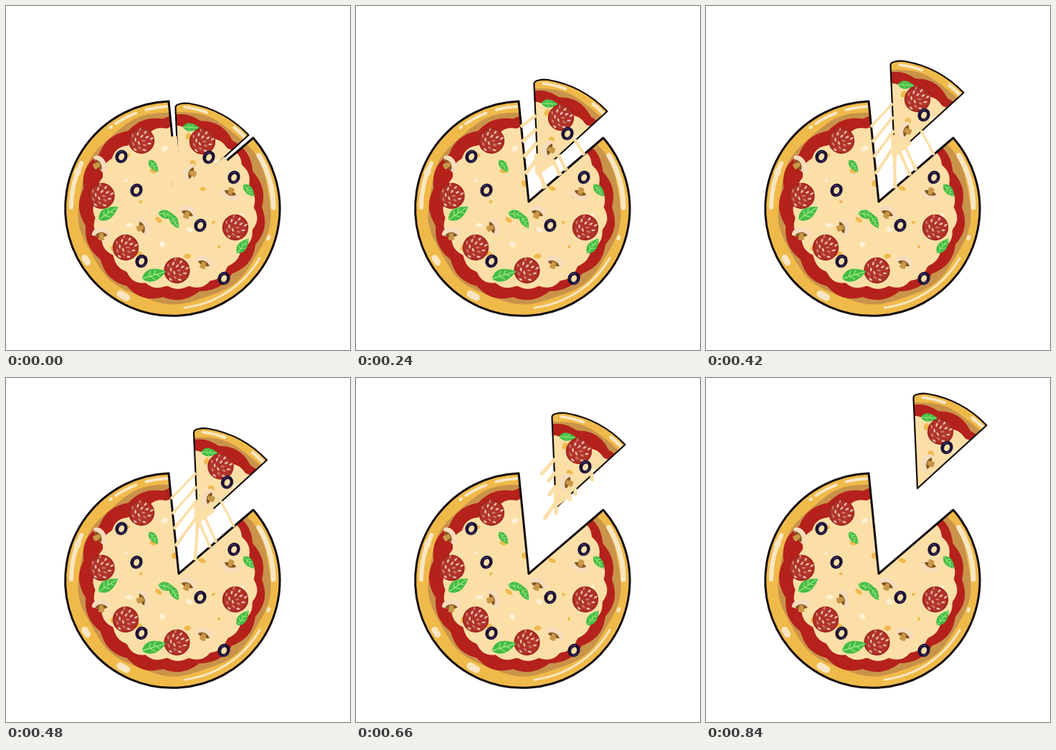
Recreate the animation shown at these times as an HTML page. Size 480 by 480 pixels, loop 0.96 s.

```html
<!DOCTYPE html>
<html lang="en">
<head>
<meta charset="utf-8">
<title>Pizza slice</title>
<style>
html, body { margin: 0; width: 100%; height: 100%; overflow: hidden; background: #fff; }
svg { display: block; width: 100vw; height: 100vh; }
</style>
</head>
<body>
<svg id="stage" viewBox="0 0 480 480"></svg>
<script>
const CHEESE = '#fcdfa7', SAUCE = '#b5211b', CRUST = '#efba49', TAN = '#c9934a',
      SHINE = '#fae6c2', INK = '#130b08', GOLD = '#efb94c';
const CX = 232, CY = 281, TAU = Math.PI * 2;
const stage = document.getElementById('stage');

const path = (d, fill, extra = '') => `<path d="${d}" fill="${fill}" ${extra}/>`;
const line = (d, color, width, cap = 'round') =>
  path(d, 'none', `stroke="${color}" stroke-width="${width}" stroke-linecap="${cap}" stroke-linejoin="round"`);
const oval = (x, y, rx, ry, fill, turn = 0) =>
  `<ellipse rx="${rx}" ry="${ry}" fill="${fill}" transform="translate(${x} ${y}) rotate(${turn})"/>`;
const place = (x, y, turn, size, body) =>
  `<g transform="translate(${x} ${y}) rotate(${turn}) scale(${size})">${body}</g>`;
const each = (list, draw) => list.map(item => draw(...item)).join('');
const loop = (count, draw) => Array.from({ length: count }, (_, i) => draw(i)).join('');
const polar = (r, a) => [CX + r * Math.cos(a), CY + r * Math.sin(a)];
const lerp = (a, b, f) => a.map((v, i) => v + (b[i] - v) * f);

// Closed outline around the pizza's centre; radius is a function of the angle.
const ring = (radius, fill) =>
  path('M' + loop(240, i => polar(radius(i / 240 * TAU), i / 240 * TAU) + ' ') + 'Z', fill);

// Highlight along the crust, angles in degrees.
function shine(from, to, width) {
  const [a, b] = [from, to].map(deg => polar(141, deg * TAU / 360));
  return line(`M${a}A141 141 0 0 1 ${b}`, SHINE, width);
}

const pepperoni = (x, y) => place(x, y, 0, 1,
  '<circle r="18.2" fill="#a3261f"/><circle r="16" fill="#b0342a"/>' + loop(16, i => {
    const r = 4 * Math.sqrt(i + .5), a = i * 2.4;
    return oval(r * Math.cos(a), r * Math.sin(a), 2.7, 1.3, i % 3 ? '#eabfb0' : '#d07a6c', i * 67);
  }));

const olive = (x, y) => place(x, y, 25, 1,
  oval(0, 0, 8.5, 9.4, '#1c1135') + oval(.3, .2, 3.8, 5, CHEESE) +
  line('M-6-2Q-5-6-1-7M6 2Q5 5 3 7', '#56447c', 1));

const leaf = (x, y, turn, size) => place(x, y, turn, size,
  path('M-16 1Q-6-16 17 0Q-4 16-16 1Z', '#43bd43') +
  line('M-15 1L14 0M-7 1L-3-5M0 0L4-5M-5 1L0 6M3 0L7 4', '#9be685', 1.3));

const mushroom = (x, y, turn) => place(x, y, turn, .88,
  path('M-15 3C-15-13 15-13 15 3Q0 8-15 3Z', '#f7dcbc') +
  path('M-10 3Q0-6 10 3Q6 7 0 5Q-6 7-10 3Z', '#85571f') +
  path('M-3 0H3L5 10Q0 13-5 10Z', '#c99748'));

function spot(i) {
  const [x, y] = polar(21 * Math.sqrt(i + .5), i * 2.4);
  return oval(x, y, 2.5 + i * 7 % 4, 2 + i * 5 % 4, i % 3 ? GOLD : '#fdf0d3', i * 40);
}

const scallop = (a, count) => Math.abs(Math.sin(a * count / 2));
const pie =
  `<circle cx="${CX}" cy="282.5" r="150" fill="${CRUST}"/>` +
  ring(a => 134 + 3 * Math.cos(a) + 1.5 * Math.sin(9 * a), TAN) +
  each([[180,206,6], [200,201,9], [232,233,4], [236,249,4], [255,267,4], [277,290,4], [308,316,5],
    [329,360,7], [17,18,5], [30,83,3], [117,121,10], [147,150,9]], shine) +
  ring(a => 125 + 5 * scallop(a, 15) + 2 * Math.sin(4 * a), SAUCE) +
  ring(a => 110 + 4 * Math.cos(a - .4) + 4 * scallop(a, 23) + 2 * Math.sin(7 * a), CHEESE) +
  loop(24, spot) +
  each([[131,220,60], [312,263,200], [254,287,22], [133,317,0], [192,308,70], [277,357,22], [256,232,-70]], mushroom) +
  each([[189,188], [133.5,265], [320,309], [167,337], [238.5,369], [274,189]], pepperoni) +
  each([[161,210], [182,257], [318,239], [271,306], [189,356], [304,380], [283,211]], olive) +
  each([[206,223,55,.65], [339,257,50,.7], [142,289,-32,1], [224,291,15,.75], [235,300,60,.7], [330,335,-50,.8],
    [206,375,-15,1.08], [258,169,5,.72]], leaf);

const cut = (id, outline, width) =>
  `<clipPath id="${id}Clip"><path d="${outline}"/></clipPath><g id="${id}"><g clip-path="url(#${id}Clip)">${pie}</g>` +
  path(outline, 'none', `stroke="${INK}" stroke-width="${width}" stroke-linejoin="round"`) + '</g>';

stage.innerHTML =
  cut('rest', 'M241 273L227 133A149.7 149.7 0 1 0 345 184Z', 3) +
  cut('slice', 'M242 268L236.5 142Q236 138 243 136.5Q249 135 256 136A149 149 0 0 1 338.5 180Z', 2.2) +
  '<g id="cheese"></g>';
const slice = document.getElementById('slice'), cheese = document.getElementById('cheese');

// Step, then how far the slice has been pulled from the pizza.
const keys = [[0,0,0], [2,0,-4], [4,12,-33], [7,21,-59], [9,30,-72], [11,37,-87], [14,53,-114]];
function pulled(step) {
  const i = Math.max(1, keys.findIndex(key => key[0] >= step)), [a, b] = [keys[i - 1], keys[i]];
  return lerp(a, b, (step - a[0]) / (b[0] - a[0])).slice(1);
}

// Both sides of the cut, from tip to crust, and where cheese sticks along them.
const sides = [
  { rest: [[241,273], [227,133]], slice: [[242,268], [236.5,142]], spots: [.75, .6, .45, .28], slip: .025 },
  { rest: [[241,273], [345,184]], slice: [[242,268], [338.5,180]], spots: [.22, .42, .5, .74], slip: .05 }
];

function strand(a, b, half) {
  const dx = b[0] - a[0], dy = b[1] - a[1], k = half / (Math.hypot(dx, dy) || 1);
  const [mx, my] = lerp(a, b, .5), nx = -dy * k, ny = dx * k;
  return path(`M${a[0] + nx} ${a[1] + ny}Q${mx} ${my} ${b[0] + nx} ${b[1] + ny}` +
    `L${b[0] - nx} ${b[1] - ny}Q${mx} ${my} ${a[0] - nx} ${a[1] - ny}Z`, CHEESE,
    `stroke="${CHEESE}" stroke-width="2" stroke-linejoin="round"`);
}

function cheeseAt(step, [dx, dy]) {
  const onSlice = (side, t) => lerp(...side.slice, Math.max(0, t)).map((v, i) => v + (i ? dy : dx));
  const onRest = (side, t) => lerp(...side.rest, t);
  const [left, right] = sides;
  const snapped = step > 8, left2go = snapped ? ((14 - step) / 5) ** 2 : 1;
  const closed = .65 - .3 * step;
  let out = '';
  if (closed > .1)
    out += line(`M${onRest(left, closed)}L241 271L${onRest(right, closed)}`, CHEESE, 13, 'butt');
  if (!step || !left2go) return out;

  if (step > 1)
    out += line(`M${onSlice(left, .2)}L${onSlice(left, .03)}L${onSlice(right, .2)}`, CHEESE, 8 * Math.sqrt(left2go));
  for (const side of sides) side.spots.forEach((t, i) => {
    const foot = onRest(side, t);
    if (!snapped) {
      out += strand(foot, onSlice(side, t - side.slip * step), (1.3 - t) * (1.2 + .3 * (9 - step)));
      return;
    }
    const from = onSlice(side, t - .22);
    const end = side === left ? foot : [from[0] + 1, from[1] + 42 * (1.2 - t)];
    const reach = left2go * (i % 3 || side === right && i === 0 ? .5 : 1);
    out += line(`M${from}L${lerp(from, end, reach)}`, CHEESE, 8 * Math.min(1, .3 + left2go));
  });
  return out;
}

let shown = -1;
function draw(now) {
  const step = Math.min(14, Math.floor(now % 960 / 60));
  if (step !== shown) {
    const shift = pulled(step);
    slice.setAttribute('transform', `translate(${shift})`);
    cheese.innerHTML = cheeseAt(step, shift);
    shown = step;
  }
  requestAnimationFrame(draw);
}
draw(performance.now());
</script>
</body>
</html>
```
